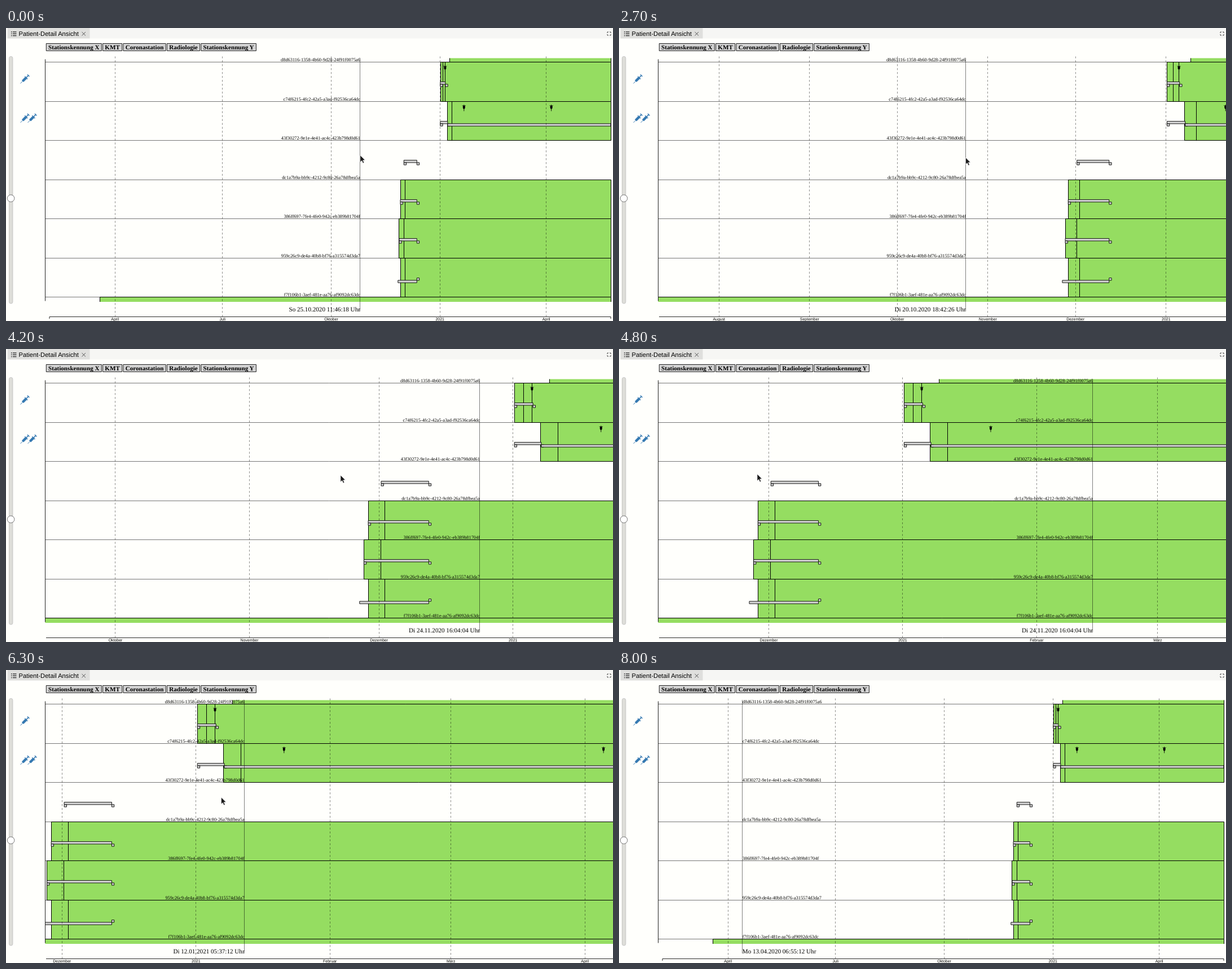
Recreate the animation shown at these times as an HTML page with a canvas. Size 1076 by 520 pixels, loop 8500 ms.

```html
<!DOCTYPE html>
<html lang="de">
<head>
<meta charset="utf-8">
<title>Patient-Detail Ansicht</title>
<style>
  html, body { margin: 0; width: 100%; height: 100%; overflow: hidden; background: #fffffc; }
  canvas { display: block; }
</style>
</head>
<body>
<canvas id="stage" width="1076" height="520"></canvas>
<script>
const ctx = document.getElementById('stage').getContext('2d');
const LOOP = 8500, STEP = 100, DAY = 864e5;
const EPOCH = Date.UTC(2021, 0, 1);
const FIRST = -330.5, LAST = 144.6;          // data range in days from EPOCH
const LEFT = 69.5, RIGHT = 1076, TOP = 53.5, BOTTOM = 486;
const AXIS_LEFT = 77, AXIS_RIGHT = 1072, AXIS_Y = 512.5;
const MIN_ZOOM = (AXIS_RIGHT - AXIS_LEFT) / (LAST - FIRST), MAX_ZOOM = 7.66;
const GREEN = '#95dd61', GREY = '#d3d3d3', BLACK = '#000', BLUE = '#3579b1';
const SERIF = '"Liberation Serif", serif', SANS = '"Liberation Sans", sans-serif';
const WARDS = ['Stationskennung X', 'KMT', 'Coronastation', 'Radiologie', 'Stationskennung Y'];
const MONTHS = ['Januar', 'Februar', 'März', 'April', 'Mai', 'Juni', 'Juli',
  'August', 'September', 'Oktober', 'November', 'Dezember'];
const WEEKDAYS = ['So', 'Mo', 'Di', 'Mi', 'Do', 'Fr', 'Sa'];

const PATIENTS = [
  'd8d63116-1358-4b60-9d28-24f91f0075a6', 'c74f6215-4fc2-42a5-a3ad-f92536ca64dc',
  '43f30272-9e1e-4e41-ac4c-423b798d0d61', 'dc1a7b9a-bb9c-4212-9c80-26a78dfbea5a',
  '386ff697-7fe4-4fe0-942c-eb389b81704f', '959c26c9-de4a-40b8-bf76-a315574d3da7',
  'f7f106b1-3aef-481e-aa76-af9092dc63dc'];

// since: infected from that day, results: days after it, ward: [from, to], germs: days
const ROWS = [
  { since: 8.42 },
  { since: .4, results: [2, 4], ward: [.33, 4.63], germs: [4.4] },
  { since: 6.4, results: [4], ward: [.33, 6.55], staysOn: true, germs: [20.37, 94.3] },
  { ward: [-30.5, -19.5] },
  { since: -33.5, results: [3.9], ward: [-33.5, -19.5] },
  { since: -34.5, results: [3.9], ward: [-34.5, -19.5] },
  { since: -33.5, results: [3.9], ward: [-35.5, -19.5], lower: true },
  { since: -287.7 }];

const day = iso => (Date.parse(iso + 'Z') - EPOCH) / DAY;
const START_DAY = day('2020-10-25T11:46:18');

// Each move: start, end, then the values reached
const POINTER = [[0, 0, 628, 226], [700, 1000, 594, 227], [1100, 1300, 515, 231],
  [1600, 1900, 614.5, 230], [3300, 3600, 840, 226], [3700, 4200, 593, 224], [4200, 4800, 245, 222],
  [4800, 5300, 52, 225], [5900, 6300, 381.5, 226], [6300, 6500, 628, 226], [7600, 8000, 219, -20]];
const RULER = [[0, 0, 627.6, START_DAY], [0, 400, 631, day('2020-10-27T03:37:03')],
  [1600, 1900, 614.4, day('2020-10-20T18:42:26')], [3300, 3600, 839.6, day('2020-11-24T16:04:04')],
  [5900, 6300, 422.3, day('2021-01-12T05:37:12')], [6300, 6500, 628, START_DAY],
  [7600, 8000, 218.5, day('2020-04-13T06:55:12')]];
const DRAG = [[0, 0, 0], [3700, 4200, -227.2], [4200, 4800, -623], [4800, 5300, -789.1]];

const progress = (t, from, to) => to > from ? Math.min(1, Math.max(0, (t - from) / (to - from))) : 1;
const easeOut = p => p * (2 - p);
const snap = v => Math.floor(v) + .5;
const rowY = i => snap(60.6 + 69.53 * i);

function glide(moves, t) {
  return moves.reduce((now, [from, to, ...goal]) => {
    const p = progress(t, from, to);
    return goal.map((v, i) => p === 1 ? v : now[i] + (v - now[i]) * p);
  }, []);
}

// Maps days to x; the data always fills the axis
function timeScale(t) {
  let k = MIN_ZOOM, x0 = AXIS_LEFT - FIRST * k;
  const zoom = (from, to, target, pivot) => {
    const before = k;
    k *= (target / k) ** easeOut(progress(t, from, to));
    x0 = pivot + (x0 - pivot) * k / before;
  };
  zoom(2100, 2700, 5.18, 633);
  zoom(3000, 3300, MAX_ZOOM, 643.7);
  x0 += glide(DRAG, t)[0];
  zoom(6600, 7500, MIN_ZOOM, 628);
  x0 = Math.min(AXIS_LEFT - FIRST * k, Math.max(AXIS_RIGHT - LAST * k, x0));
  return { k, X: d => x0 + d * k };
}

function paint(fill, stroke, width = 1) {
  ctx.fillStyle = fill;
  ctx.fill();
  if (!stroke) return;
  ctx.strokeStyle = stroke;
  ctx.lineWidth = width;
  ctx.stroke();
}

function line(points, color = BLACK, width = 1) {
  ctx.beginPath();
  points.forEach(([x, y]) => ctx.lineTo(x, y));
  ctx.strokeStyle = color;
  ctx.lineWidth = width;
  ctx.stroke();
}

function box(x, y, w, h, fill, stroke = BLACK, width = 1) {
  ctx.beginPath();
  ctx.rect(x, y, w, h);
  paint(fill, stroke, width);
}

function text(s, x, y, font, align = 'left') {
  ctx.font = font;
  ctx.textAlign = align;
  ctx.fillStyle = BLACK;
  ctx.fillText(s, x, y);
}

function clipped(x, y, w, h, draw) {
  ctx.save();
  ctx.beginPath();
  ctx.rect(x, y, w, h);
  ctx.clip();
  draw();
  ctx.restore();
}

function syringe(x, y) {
  ctx.save();
  ctx.translate(x, y);
  ctx.rotate(-Math.PI / 4);
  line([[-10.5, 0], [-4, 0]], BLUE, .9);
  line([[-5, 0], [4, 0]], BLUE, 4.4);
  line([[4, -3.6], [4, 3.6]], BLUE, 1.3);
  line([[4, 0], [9.5, 0]], BLUE, 1.6);
  line([[9.5, -2.5], [9.5, 2.5]], BLUE, 1.4);
  ctx.restore();
}

function germ(x, y) {
  ctx.beginPath();
  ctx.ellipse(x, y + 10, 2, 3.2, 0, 0, 7);
  paint(BLACK);
  line([[x - 3, y + 7], [x, y + 8.5], [x + 3, y + 7]], BLACK, .9);
  line([[x, y + 5.5], [x, y + 17]], BLACK, .9);
}

function drawChrome() {
  box(0, 0, 1076, 520, '#fffffc', null);
  box(0, 0, 1076, 18.5, '#f6f6f4', null);
  box(3, 0, 145.5, 18.5, '#dfdfdd', null);
  for (const y of [7, 10.3, 13.6]) {
    line([[9, y], [10.6, y]], '#222', 1.3);
    line([[12, y], [18.5, y]], '#222', 1.3);
  }
  text('Patient-Detail Ansicht', 22.5, 14, '11.2px ' + SANS);
  for (const s of [-1, 1]) {
    line([[134.5, 10.3 - 3.2 * s], [141, 10.3 + 3.2 * s]], '#555');
    for (const v of [-1, 1])
      line([[1069 + s, 10 + 3 * v], [1069 + 3 * s, 10 + 3 * v], [1069 + 3 * s, 10 + v]], '#444');
  }

  let x = 71.3;
  ctx.font = 'bold 11.12px ' + SERIF;
  for (const ward of WARDS) {
    const w = ctx.measureText(ward).width + 7.6;
    box(x, 27.5, w, 13, GREY, '#222');
    text(ward, x + w / 2, 37.7, ctx.font, 'center');
    x += w + 2.2;
  }

  ctx.beginPath();
  ctx.roundRect(5.5, 50.5, 6.4, 438.5, 3);
  paint('#deded9', '#bbb', .8);
  ctx.beginPath();
  ctx.arc(8.6, 302.3, 6.3, 0, 7);
  paint('#fff', '#666', .9);
  syringe(33, 91);
  syringe(33, 160.5);
  syringe(46, 160.5);
}

function drawRow({ since, results = [], ward, staysOn, lower, germs = [] }, i, X) {
  const y = rowY(i - 1), bottom = rowY(i);
  if (since !== undefined) {
    const x = snap(X(since));
    box(x, y, snap(X(LAST)) - x, bottom - y, GREEN);
    for (const d of results) line([[snap(X(since + d)), y], [snap(X(since + d)), bottom]]);
  }
  if (ward) {
    const [from, to] = ward, upperY = y + 35.1, lowerY = upperY + 4.2;
    const bar = (a, b, top) => box(X(a), top, X(b) - X(a), 4.3, GREY, BLACK, .9);
    const transfer = (d, top) => box(X(d), top, 4.3, 4.2, GREY, BLACK, .9);
    bar(from, to, lower ? lowerY : upperY);
    transfer(to, lower ? upperY : lowerY);
    if (!lower) transfer(from, lowerY);
    if (staysOn) bar(to, LAST, lowerY);
  }
  for (const d of germs) germ(X(d), y);
}

function drawTicks(k, X) {
  for (let m = 0; m < 18; m += k < 3.86 ? 3 : 1) {
    const d = (Date.UTC(2020, m, 1) - EPOCH) / DAY, x = snap(X(d));
    if (d < FIRST || d > LAST || x < LEFT) continue;
    ctx.setLineDash([3.475, 3.475]);
    line([[x, AXIS_Y], [x, 50.5]], 'rgba(0,0,0,.5)', .9);
    ctx.setLineDash([]);
    text(m === 12 ? '2021' : MONTHS[m % 12], X(d), 519.2, '6.95px ' + SANS, 'center');
  }
}

function formatDate(d) {
  const date = new Date(Math.round((EPOCH + d * DAY) / 1000) * 1000);
  const [ymd, hms] = date.toISOString().slice(0, 19).split('T');
  return `${WEEKDAYS[date.getUTCDay()]} ${ymd.split('-').reverse().join('.')} ${hms} Uhr`;
}

function drawRuler(x, d) {
  const align = x < 250 ? 'left' : 'right';
  PATIENTS.forEach((id, i) => text(id, x + .3, rowY(i) - 1.5, '8.34px ' + SERIF, align));
  text(formatDate(d), x + .3, 503, '11.12px ' + SERIF, align);
  line([[snap(x), 53], [snap(x), 503]], 'rgba(0,0,0,.5)');
}

function drawPointer(x, y) {
  ctx.beginPath();
  for (const [dx, dy] of [[0, 0], [0, 12], [2.8, 9.4], [4.8, 14], [6.8, 13.1], [4.8, 8.7], [8.5, 8.5]])
    ctx.lineTo(x + dx, y + dy);
  ctx.closePath();
  paint('#1a1a1a', '#fff', .6);
}

function draw(t) {
  const { k, X } = timeScale(t);
  ctx.textRendering = 'geometricPrecision';
  drawChrome();
  PATIENTS.forEach((_, i) =>
    line([[LEFT, rowY(i)], [Math.min(X(LAST), RIGHT), rowY(i)]], '#777'));
  clipped(LEFT, TOP, RIGHT - LEFT, BOTTOM - TOP, () => ROWS.forEach((row, i) => drawRow(row, i, X)));
  drawTicks(k, X);
  line([[LEFT, 55.5], [LEFT, 484.5]], '#222');
  clipped(71, 505, RIGHT - 71, 15, () =>
    line([[X(FIRST), 516], [X(FIRST), AXIS_Y], [X(LAST), AXIS_Y], [X(LAST), 516]], '#111', .9));
  drawRuler(...glide(RULER, t));
  drawPointer(...glide(POINTER, t));
}

const start = performance.now();
function tick() {
  const t = (performance.now() - start) % LOOP;
  draw(Math.floor(t / STEP) * STEP);
  requestAnimationFrame(tick);
}
tick();
</script>
</body>
</html>
```
